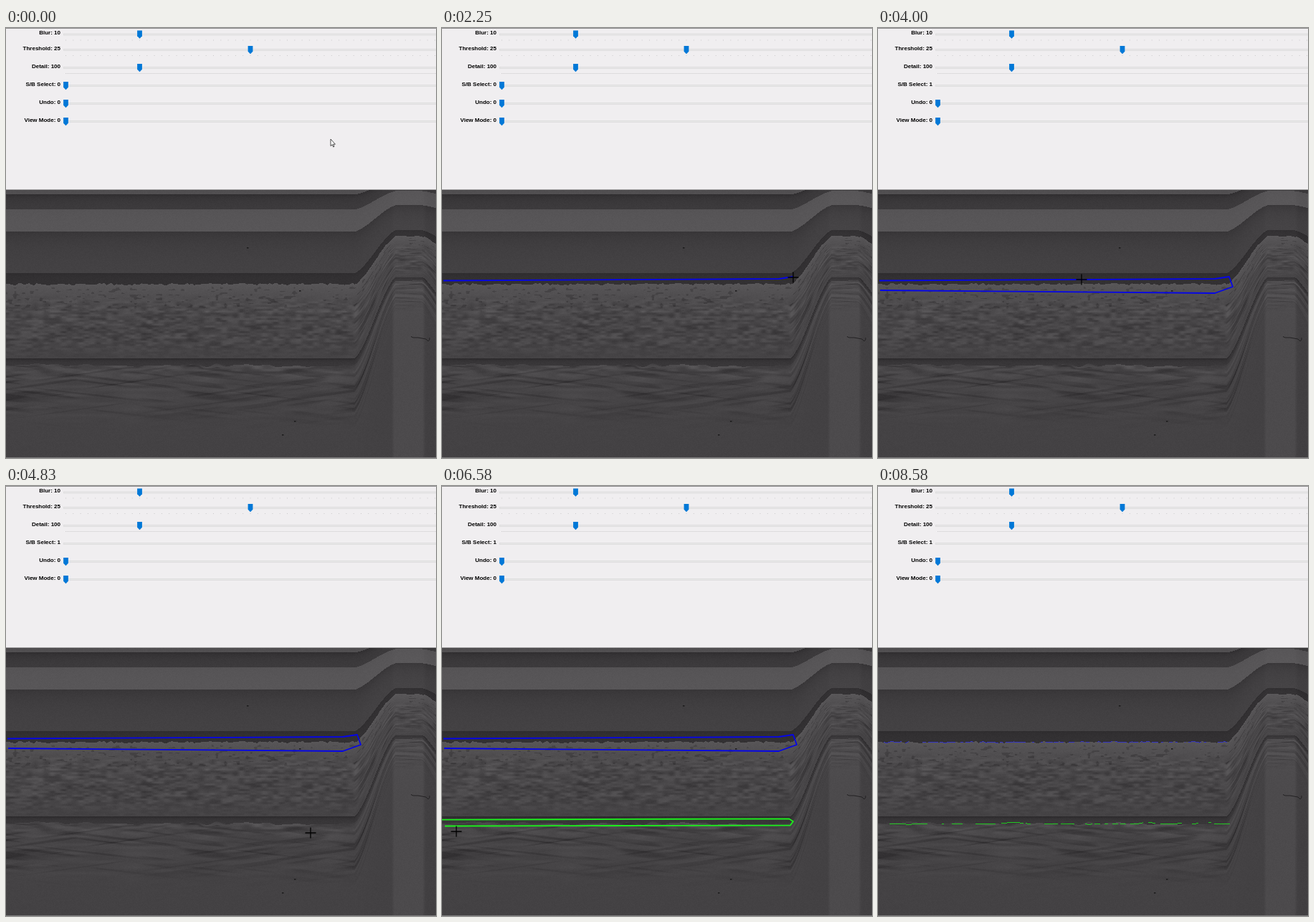
Recreate the animation shown at these times as an HTML page with a canvas. Size 600 px wide and 600 px high, loop 8.91 s.

```html
<!DOCTYPE html>
<html lang="en">
<head>
<meta charset="utf-8">
<title>Scan boundary selection</title>
<style>
  html, body { margin: 0; width: 100%; height: 100%; overflow: hidden; background: #f0eef0; }
  canvas, svg { position: absolute; left: 0; top: 0; width: 600px; height: 600px; display: block; }
  text { font: bold 8px "Liberation Sans", Arial, sans-serif; text-anchor: end; fill: #000; }
  .line { fill: none; stroke-width: 1.8; stroke-linejoin: round; }
</style>
</head>
<body>
<canvas id="scan" width="600" height="600"></canvas>
<svg viewBox="0 0 600 600">
  <rect width="600" height="1" fill="#8c8b8c"/>
  <g id="panel"></g>
  <g id="found" shape-rendering="crispEdges"></g>
  <path id="blue" class="line" stroke="#0505e8"/>
  <path id="green" class="line" stroke="#1cf01c"/>
  <path id="cross" d="M-7.5 0H7.5M0 -7.5V7.5" stroke="#000" stroke-width="1.3"/>
  <path id="arrow" d="M0 0V9.6L2.2 7.7L3.7 11L5 10.4L3.6 7.2H6.4Z" fill="#fff" stroke="#222" stroke-width=".8"/>
</svg>
<script>
const LOOP = 8910, TICK = 1000 / 12, TOP = 226;
const PICKED = 3670, DETECTED = 7830;
const $ = id => document.getElementById(id);
const clamp = v => Math.max(0, Math.min(1, v));
const mix = (a, b, p) => a + (b - a) * p;
const smooth = (a, b, v) => { const p = clamp((v - a) / (b - a)); return p * p * (3 - 2 * p); };
const bump = (v, at, width) => Math.exp(-(((v - at) / width) ** 2));

// --- seeded value noise ---
function hash(i, j) {
  let n = Math.imul(i, 374761393) + Math.imul(j, 668265263) | 0;
  n = Math.imul(n ^ n >>> 13, 1274126177);
  return ((n ^ n >>> 16) >>> 0) / 4294967296;
}
function noise(x, y) {
  const i = Math.floor(x), j = Math.floor(y);
  const a = smooth(0, 1, x - i), b = smooth(0, 1, y - j);
  return mix(mix(hash(i, j), hash(i + 1, j), a), mix(hash(i, j + 1), hash(i + 1, j + 1), a), b);
}

// --- layered scan: flat on the left, lifted to a ridge on the right ---
// Each layer: top depth, tone at its top, tone it settles to.
const LAYERS = [
  [226, 78, 80], [232, 47, 60], [253, 84, 87], [284, 55, 67],
  [342, 46, 50], [357, 87, 67], [461, 43, 57], [470, 75, 66]
];

function tone(d) {
  let i = LAYERS.length - 1;
  while (i > 0 && d < LAYERS[i][0]) i--;
  const [top, from, to] = LAYERS[i], next = i + 1 < LAYERS.length ? LAYERS[i + 1][0] : 600;
  return mix(to, from, Math.exp(-Math.max(0, d - top) * 3 / (next - top)));
}

const rise = d => 20 + 94 * (Math.max(0, d - 232) / 229) ** 1.15;

// Undo the lift of the ridge by fixed-point iteration.
function depth(x, y) {
  if (x < 486) return y;
  const lift = (smooth(486, 543, x) + clamp((x - 486) / 57)) / 2;
  const fall = clamp((x - 580) / 20) ** 1.3;
  let d = y;
  for (let i = 0; i < 12; i++) d = y + rise(d) * lift - fall * (4 + Math.max(0, d - 300) * .12);
  return d;
}

const rough = x => (noise(x / 3.5, 7) - .5) * 3;
const wavy = x => (noise(x / 14, 31) - .5) * 5;

function shade(x, y) {
  let d = depth(x, y);
  if (Math.abs(d - 357) < 5) d += rough(x);
  if (Math.abs(d - 471) < 4) d += wavy(x);
  let v = tone(d);
  if (d > 361 && d < 460) {
    const amp = smooth(366, 395, d) * (1 - .7 * smooth(430, 458, d));
    v += amp * (24 * (noise(x / 8, d / 2.6) - .5) + 12 * (noise(x / 22, d / 5) - .5));
    v -= 14 * smooth(.76, .84, noise(x / 6, d / 2.4 + 90)) * (1 - smooth(385, 400, d));
  }
  if (d > 470 && d < 570) {
    const fade = 1 - smooth(500, 570, d);
    v += fade * 14 * (noise(x / 45, d / 4) - .5);
    for (const slope of [.14, -.12]) v -= fade * 11 * smooth(.55, .85, noise(x / 70, (d + x * slope) / 3.5));
    v += (1 - smooth(474, 496, d)) * 18 * (noise(x / 14, d / 3) - .5);
  }
  const column = smooth(537, 542, x) - smooth(580, 585, x);
  v += column * (d > 475 ? 9 : 2) - 2 * smooth(582, 588, x);
  return v + (hash(x, y) - .5) * 4;
}

function paintScan() {
  const c = $('scan').getContext('2d'), img = c.createImageData(600, 600 - TOP);
  for (let o = 0; o < img.data.length; o += 4) {
    const x = o / 4 % 600, v = shade(x, TOP + Math.floor(o / 2400));
    img.data.set([v + 1, v - 1, v + 1, 255], o);
  }
  c.putImageData(img, 0, TOP);
  c.fillStyle = '#a5a4a5';
  c.fillRect(0, TOP - 1, 600, 1);
  c.fillStyle = '#7a797a';
  c.fillRect(0, 599, 600, 1);
  c.fillStyle = '#1c1b1c';
  for (const [x, y] of [[385, 567], [409, 366], [336, 306], [402, 548]]) c.fillRect(x, y, 2.5, 1.6);
  c.strokeStyle = '#222122';
  c.stroke(new Path2D('M565 430.5L568 432H575L586 434L589 437L591 435V432'));
}

// --- slider panel: name, value, pixels per unit ---
const SLIDERS = [
  ['Blur', 10, 10.3], ['Threshold', 25, 10.3], ['Detail', 100, 1.03],
  ['S/B Select', 0, 0], ['Undo', 0, 0], ['View Mode', 0, 0]
];

function slider([name, value, unit], i) {
  const y = i ? 5 + 25 * i : 8.5, x = 83.5 + value * unit;
  const ticks = unit && `<path d="M83 ${y + 8.5}H600" stroke="#cac9ca" stroke-dasharray="1 ${Math.max(unit - 1, 1)}"/>`;
  return `<rect x="80.5" y="${y - .5}" width="530" height="2" fill="#e9e9e9" stroke="#dbdadb" stroke-width=".8"/>
    ${ticks || ''}
    <path id="thumb${i}" d="M${x - 3.4} ${y - 5}h6.8v7.8l-3.4 3.4l-3.4 -3.4z" fill="#0078d7"/>
    <text id="label${i}" x="76" y="${y + .5}">${name}: ${value}</text>`;
}
$('panel').innerHTML = SLIDERS.map(slider).join('');

// --- detected boundaries ---
function trace(color, from, to, yAt, on) {
  let d = '';
  for (let x = from; x < to; x++) if (on(x)) d += `M${x} ${Math.round(yAt(x)) + .5}h1`;
  return `<path d="${d}" stroke="${color}"/>`;
}
$('found').innerHTML =
  trace('#3434c4', 0, 487, x => 357 - rough(x) / 2, x => noise(x / 4, 12) > .36)
  + trace('#22c822', 5, 491, x => 471 + wavy(x) / 4 - 2 * (bump(x, 190, 12) + bump(x, 374, 10) + bump(x, 458, 9)),
      x => x > 468 || noise(x / 6, 44) > .44);

// --- clicked outlines: long edges take several evenly timed clicks ---
function clicks(corners, start, end) {
  const pts = [corners[0]];
  corners.slice(1).forEach(([x, y], i) => {
    const [px, py] = corners[i], n = Math.ceil(Math.hypot(x - px, y - py) / 165);
    for (let k = 1; k <= n; k++) pts.push([mix(px, x, k / n), mix(py, y, k / n)]);
  });
  return pts.map(([x, y], i) => [mix(start, end, i / (pts.length - 1)), x, y]);
}
const BLUE = clicks([[2, 352.5], [470, 350], [490, 347], [495, 361], [470, 370], [3, 366]], 1420, 3250);
const GREEN = clicks([[0, 465.7], [484, 464.3], [490, 468], [486, 473.5], [4, 474.5]], 5170, 6290);

// --- pointer: time, x, y ---
const POINTER = [
  [0, 453, 155], [420, 453, 155], [1080, 20, 362], ...BLUE, [3330, 13, 375], [3580, 92, 82],
  [PICKED, 95, 82], [4080, 330, 416], [4830, 425, 484], ...GREEN, [5920, 179, 507],
  [7330, 63, 503], [7500, 63, 503], [7670, -20, 490]
].sort((a, b) => a[0] - b[0]);

function pointerAt(t) {
  let i = 1;
  while (i < POINTER.length - 1 && t > POINTER[i][0]) i++;
  const [t0, x0, y0] = POINTER[i - 1], [t1, x1, y1] = POINTER[i], p = clamp((t - t0) / (t1 - t0));
  return [Math.round(mix(x0, x1, p)), Math.round(mix(y0, y1, p))];
}

const show = (id, on) => $(id).style.display = on ? '' : 'none';
function outline(id, pts, t) {
  const seen = pts.filter(p => t >= p[0]).map(p => p[1] + ' ' + p[2]);
  $(id).setAttribute('d', seen.length > 1 ? 'M' + seen.join('L') : '');
  show(id, t < DETECTED);
}

function render(t) {
  const [x, y] = pointerAt(t), picked = t >= PICKED;
  for (const id of ['cross', 'arrow']) $(id).setAttribute('transform', `translate(${x} ${y})`);
  show('cross', y >= TOP);
  show('arrow', y < TOP);
  outline('blue', BLUE, t);
  outline('green', GREEN, t);
  show('found', t >= DETECTED);
  show('thumb3', !picked);
  $('label3').textContent = 'S/B Select: ' + (picked ? 1 : 0);
}

paintScan();
const start = performance.now();
function loop() {
  const t = (performance.now() - start) % LOOP;
  render(Math.round(Math.floor((t + 5) / TICK) * TICK / 10) * 10);
  requestAnimationFrame(loop);
}
loop();
</script>
</body>
</html>
```
